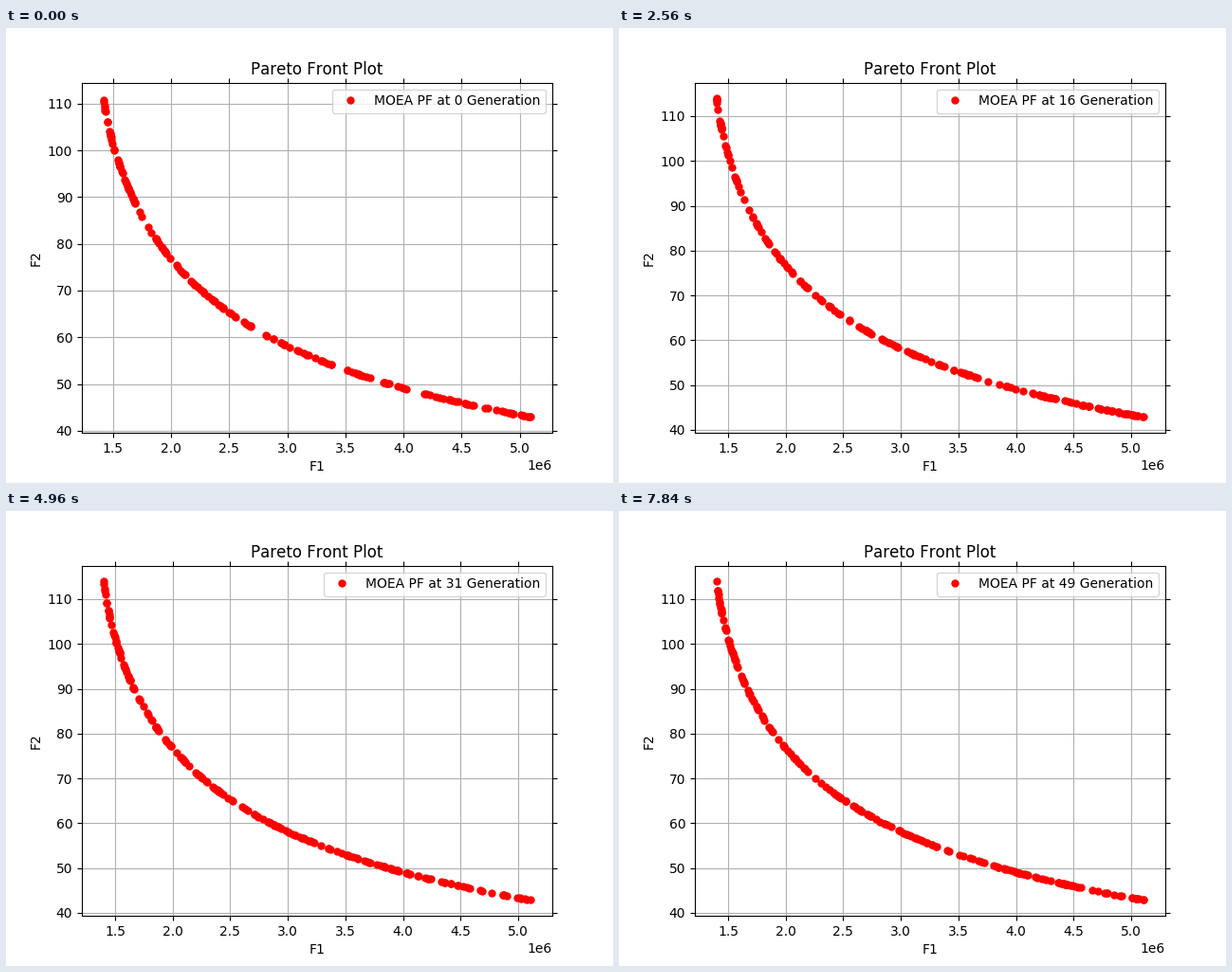
These frames come from a looping animation (640 by 480 pixels, 8000 ms). A matplotlib script:

```python
import numpy as np
import matplotlib.pyplot as plt
from matplotlib.animation import FuncAnimation

plt.rcParams["text.kerning_factor"] = 6

GENERATIONS = 50
INTERVAL = 160
SETTLED = 7  # generation at which the ends of the front stop moving

# Data span: x in millions, then y
FIRST = np.array([1.41547, 5.09637, 42.928, 111.0956])
FINAL = np.array([1.39724, 5.11149, 42.870, 113.9227])

# Key points of the front, joined by a polynomial in log(x - POLE)
POLE = 1.294
KEYS = np.array([(1.39724, 113.9227), (1.516, 99.8), (1.805, 83.46),
                 (2.521, 64.95), (3.46, 53.38), (5.11149, 42.870)])
FIT = np.polyfit(np.log(KEYS[:, 0] - POLE), KEYS[:, 1], len(KEYS) - 1)

# Front sampled by its length in pixels
U = np.linspace(*np.log(FINAL[:2] - POLE), 2000)
X, Y = POLE + np.exp(U), np.polyval(FIT, U)
STEP = np.hypot(np.diff(X) * 121.4, np.diff(Y) * 4.729)
LENGTH = np.concatenate([[0], np.cumsum(STEP)])


def progress(gen):
    return 1 - (1 - min(gen / SETTLED, 1)) ** 2


def span(gen):
    return FIRST + (FINAL - FIRST) * progress(gen)


def population(gen):
    """Randomly spaced dots; the widest breaks close as the front settles."""
    rng = np.random.default_rng(gen + 7)
    first, last = np.interp(span(gen)[:2], X, LENGTH)
    widest = 21 - 9 * progress(gen)
    spacing = np.minimum(rng.exponential(3.4, 400), widest)
    s = first + np.cumsum(spacing)
    s = np.concatenate([[first], s[s < last], [last]])
    return np.interp(s, LENGTH, X) * 1e6, np.interp(s, LENGTH, Y)


def padded(lo, hi):
    pad = 0.05 * (hi - lo)
    return lo - pad, hi + pad


def label(gen):
    return f"MOEA PF at {gen} Generation"


fig, ax = plt.subplots(figsize=(6.4, 4.8), dpi=100)
dots, = ax.plot([], [], "ro", markersize=5, label=label(0))
ax.set_title("Pareto Front Plot")
ax.set_xlabel("F1")
ax.set_ylabel("F2")
ax.grid(True)
ax.tick_params(top=True, right=True)
legend = ax.legend(loc="upper right")


def draw(gen):
    x0, x1, y0, y1 = span(gen)
    ax.set_xlim(*padded(x0 * 1e6, x1 * 1e6))
    ax.set_ylim(*padded(y0, y1))
    dots.set_data(*population(gen))
    legend.get_texts()[0].set_text(label(gen))
    return dots, legend


anim = FuncAnimation(fig, draw, frames=GENERATIONS, interval=INTERVAL,
                     init_func=lambda: draw(0), repeat=True, repeat_delay=0)
plt.show()
```
